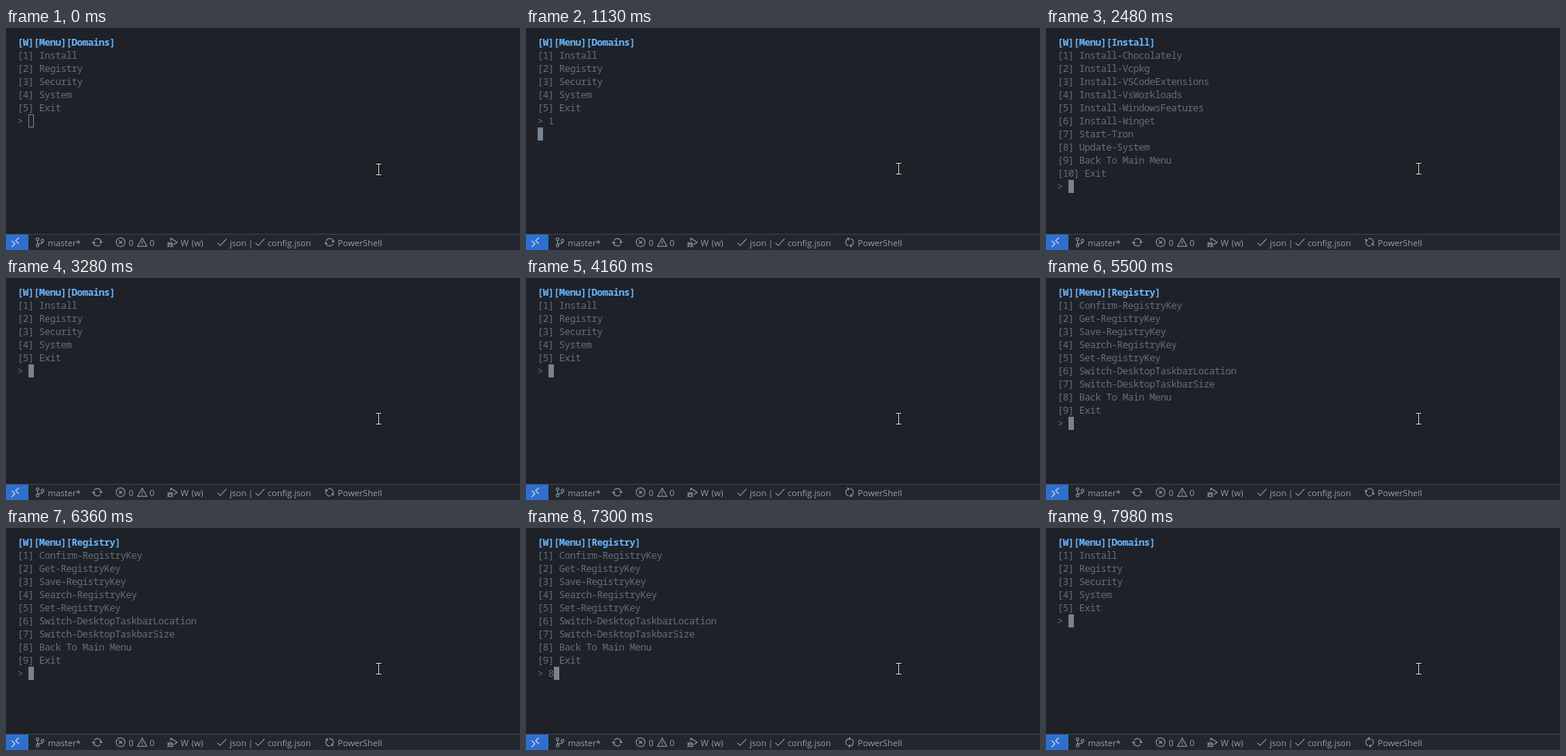
These frames come from a looping animation (664x288 px, 8000 ms). An HTML page:

```html
<!DOCTYPE html>
<html lang="en">
<head>
<meta charset="utf-8">
<title>Terminal menu</title>
<style>
  html, body { margin: 0; width: 100%; height: 100%; overflow: hidden; background: #1e2228; }
  svg { display: block; width: 664px; height: 288px; }
  #terminal text { font: 12.5px "Noto Sans Mono", monospace; letter-spacing: -.5px; fill: #636e7b; white-space: pre; }
  #terminal .title { fill: #6cb6ff; font-weight: 600; }
  #cursor { fill: #768390; stroke: #768390; }
  #cursor.idle { fill: none; }
  #status text { font: 11.1px "Open Sans", sans-serif; fill: #929dab; word-spacing: 1px; }
  #icons { fill: none; stroke: #929dab; stroke-width: 1.15; }
</style>
</head>
<body>
<svg viewBox="0 0 664 288">
  <g id="terminal"></g>
  <rect id="cursor" width="6" height="16"/>
  <g id="mouse" fill="none">
    <path d="M477.5 175.5h8M481.5 175v15M477.5 189.5h8" stroke="#0b0d10" stroke-width="2.4"/>
    <path d="M478 175.5h7M481.5 175v15M478 189.5h7" stroke="#d8dadd"/>
  </g>
  <g id="status">
    <rect y="268" width="664" height="20" fill="#22272e"/>
    <path d="M0 267.5H664" stroke="#3b4450"/>
    <rect y="268" width="29" height="20" fill="#2f6fd0"/>
    <path d="M7.5 276l4 4-4 4M16.5 272l-4 4 4 4" fill="none" stroke="#c9d8ee" stroke-width="1.1"/>
    <g id="icons"></g>
  </g>
</svg>
<script>
const LOOP = 8000, LEFT = 15, TOP = 10, CELL = 7, ROW = 17;
const SPIN_TICK = 50.5, SPIN_ANGLE = 12;

const menus = {
  Domains: ["Install", "Registry", "Security", "System", "Exit"],
  Install: ["Install-Chocolately", "Install-Vcpkg", "Install-VSCodeExtensions", "Install-VsWorkloads",
    "Install-WindowsFeatures", "Install-Winget", "Start-Tron", "Update-System", "Back To Main Menu", "Exit"],
  Registry: ["Confirm-RegistryKey", "Get-RegistryKey", "Save-RegistryKey", "Search-RegistryKey", "Set-RegistryKey",
    "Switch-DesktopTaskbarLocation", "Switch-DesktopTaskbarSize", "Back To Main Menu", "Exit"]
};

// Start time, menu, typed answer, whether Enter was pressed
const steps = [
  [0, "Domains", "", false],
  [930, "Domains", "1", false],
  [1060, "Domains", "1", true],
  [1260, "Install", "", false],
  [2860, "Install", "9", false],
  [3050, "Install", "9", true],
  [3180, "Domains", "", false],
  [4780, "Domains", "2", false],
  [5020, "Registry", "", false],
  [7100, "Registry", "8", false],
  [7340, "Domains", "", false]
];

const iconShapes = {
  branch: "M6.3 3.3a2 2 0 1 1-4 0a2 2 0 1 1 4 0M6.3 12.8a2 2 0 1 1-4 0a2 2 0 1 1 4 0" +
    "M13.7 5.5a2 2 0 1 1-4 0a2 2 0 1 1 4 0M4.3 5.3v5.5M11.7 7.5q0 2.5-3 2.5h-2q-2.4 0-2.4 1",
  sync: "M.4 9.1l2.1-2.1 2.1 2.1M2.5 7.5A5.5 5.5 0 0 0 12.7 10.8M11.4 6.9l2.1 2.1 2.1-2.1M13.5 8.5A5.5 5.5 0 0 0 3.3 5.2",
  error: "M14.5 8a6.5 6.5 0 1 1-13 0a6.5 6.5 0 1 1 13 0M5.5 5.5l5 5M10.5 5.5l-5 5",
  warning: "M8 1.8L14.8 14H1.2ZM8 6v4.3M8 11.3v1.3",
  debug: "M5.5 6V2L15 8l-5 3.4M2.5 10.5a2.2 2.2 0 0 1 4.4 0v2a2.2 2.2 0 0 1-4.4 0ZM2.5 10.5h4.4" +
    "M.5 8.5l2 1.5M8.9 8.5l-2 1.5M.3 12h2.2M6.9 12h2.2M.6 15l2-1.5M8.8 15l-2-1.5",
  check: "M1.5 9l4 4L14.5 3"
};

const icons = document.getElementById("icons");
const status = document.getElementById("status");
const terminal = document.getElementById("terminal");
const cursor = document.getElementById("cursor");
const mouse = document.getElementById("mouse");

function add(parent, tag, attributes, text = "") {
  const node = document.createElementNS("http://www.w3.org/2000/svg", tag);
  for (const name in attributes) node.setAttribute(name, attributes[name]);
  node.textContent = text;
  return parent.appendChild(node);
}

function addIcon(name, x) {
  const group = add(icons, "g", { transform: `translate(${x} 271) scale(.875)` });
  return add(group, "path", { d: iconShapes[name] });
}

[["branch", 37], ["sync", 111], ["error", 141], ["warning", 169], ["debug", 208], ["check", 272], ["check", 321]]
  .forEach(([name, x]) => addIcon(name, x));
const spinner = addIcon("sync", 411);

[["master*", 54], ["0", 158.5], ["0", 185.5], ["W (w)", 225.5], ["json", 289], ["|", 313], ["config.json", 338], ["PowerShell", 428.5]]
  .forEach(([label, x]) => add(status, "text", { x, y: 283 }, label));

function drawScreen([, menu, typed, entered]) {
  const lines = [`[W][Menu][${menu}]`, ...menus[menu].map((item, i) => `[${i + 1}] ${item}`), "> " + typed];
  terminal.replaceChildren();
  lines.forEach((line, row) =>
    add(terminal, "text", { x: LEFT - 0.25, y: TOP + 13 + row * ROW, class: row ? "" : "title" }, line));
  const column = entered ? 0 : 2 + typed.length;
  const row = entered ? lines.length : lines.length - 1;
  cursor.setAttribute("x", LEFT + column * CELL + 0.5);
  cursor.setAttribute("y", TOP + row * ROW + 0.5);
}

let shown;
function render(now) {
  const t = now % LOOP;
  const step = steps.findLast(([start]) => start <= t);
  if (step !== shown) drawScreen(shown = step);
  const idle = t < 70;
  cursor.setAttribute("class", idle ? "idle" : "");
  mouse.setAttribute("transform", `translate(0 ${idle ? 1 : 0})`);
  const tick = Math.floor(t / SPIN_TICK) - 1;
  spinner.setAttribute("transform", `rotate(${tick * SPIN_ANGLE} 8 8)`);
}

const began = performance.now();
function frame() {
  render(performance.now() - began);
  requestAnimationFrame(frame);
}
frame();
</script>
</body>
</html>
```
